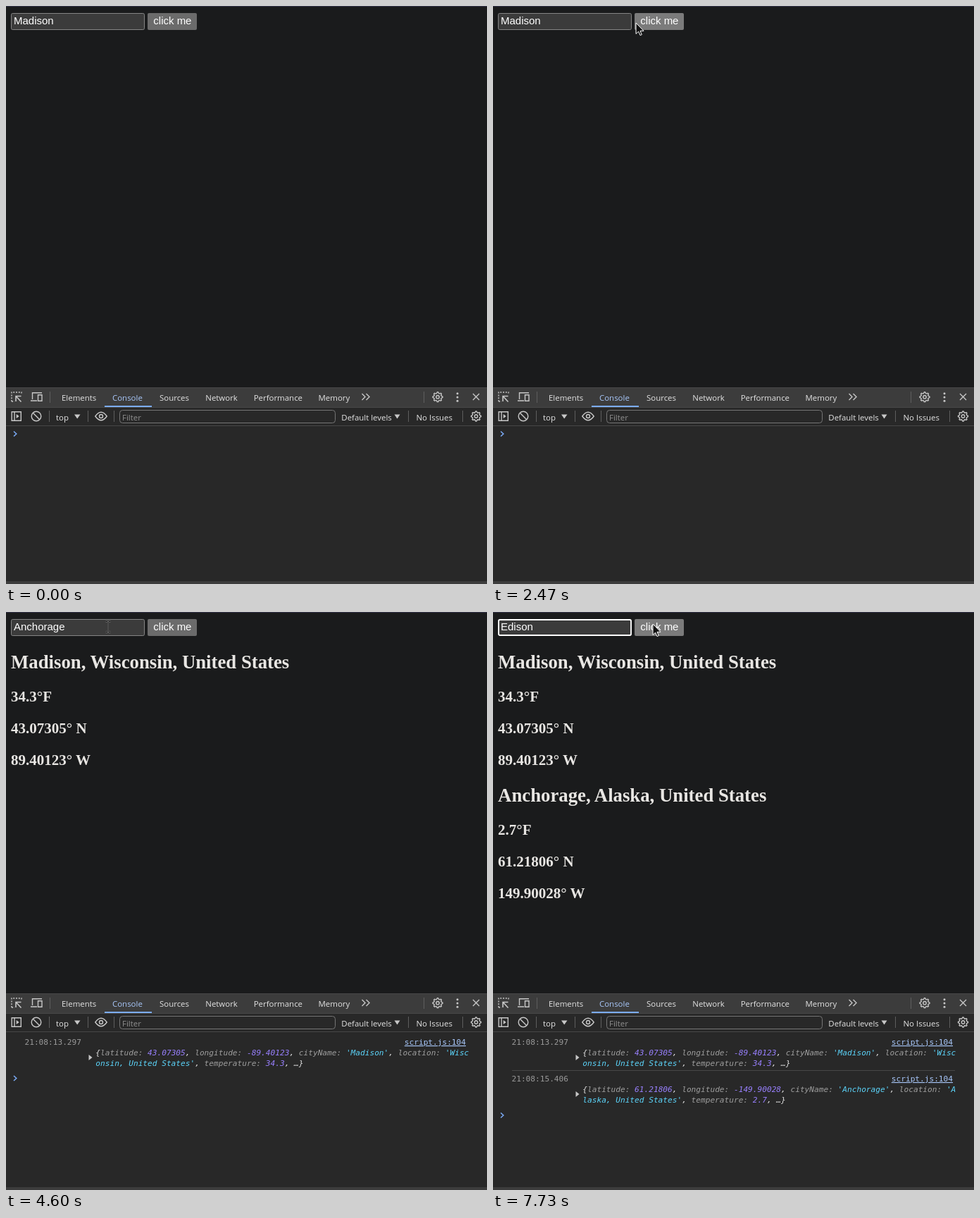
Recreate the animation shown at these times as an HTML page. Size 683x820 px, loop 8000 ms.

```html
<!DOCTYPE html>
<html lang="en">
<head>
<meta charset="utf-8">
<title>Weather lookup</title>
<style>
  html, body { margin: 0; width: 100%; height: 100%; overflow: hidden; background: #1a1b1c; }
  svg { display: block; }
  text { white-space: pre; }
  .ui { font: 11.45px "Open Sans", "Noto Sans", sans-serif; fill: #e3e3e3; }
  .field { font: 15px "Liberation Sans", Arial, sans-serif; fill: #fff; }
  .place { font: bold 26.75px "Liberation Serif", "Times New Roman", serif; fill: #e8e6e3; }
  .fact { font: bold 21px "Liberation Serif", "Times New Roman", serif; fill: #e8e6e3; }
  .mono { font: 11.15px "DejaVu Sans Mono", monospace; fill: #e3e3e3; }
  .preview { font-style: italic; }
  .key { fill: #9e9e9e; }
  .num { fill: #9980ff; }
  .str { fill: #5cd5fb; }
  .icon { fill: none; stroke: #c7c7c7; stroke-width: 1.4; }
  .solid { fill: #c7c7c7; }
  .sep { stroke: #5e5e5e; }
</style>
</head>
<body>
<svg id="stage" width="683" height="820" viewBox="0 0 683 820">
  <defs>
    <g id="gear" class="icon">
      <path id="teeth" stroke-linejoin="round"/>
      <circle r="2.2"/>
    </g>
    <path id="beam" d="M-3.5 -7.5H-1L0 -6.5 1 -7.5H3.5M0 -6.5V6.5M-3.5 7.5H-1L0 6.5 1 7.5H3.5"/>
  </defs>
  <rect width="683" height="820" fill="#1a1b1c"/>
  <rect width="683" height="1" fill="#303045"/>

  <g id="results"></g>

  <rect x="7.5" y="10.5" width="189" height="23" rx="2" fill="#3b3b3b" stroke="#858585"/>
  <rect id="ring" x="8" y="11" width="188" height="22" rx="2" fill="none" stroke="#fff" stroke-width="1.8"/>
  <rect id="selection" x="11" y="12" height="17" fill="#0855a6"/>
  <text id="value" class="field" x="11" y="26"></text>
  <rect id="caret" y="12" width="1" height="17" fill="#fff"/>
  <rect id="button" x="201" y="10" width="70" height="24" rx="2"/>
  <text class="field" x="209.3" y="26">click me</text>

  <g id="popup">
    <path d="M90 42.5L99.5 34.5 109 42.5Z" fill="#292a2c"/>
    <rect id="popupBox" x="79.5" y="42" width="160" rx="9" fill="#292a2c"/>
    <text id="option1" class="ui" x="92" y="68.3" style="fill:#fff"></text>
    <text id="option2" class="ui" x="92" y="104.8" style="fill:#fff">Madisonasd</text>
  </g>

  <rect y="541" width="683" height="279" fill="#282828"/>
  <rect y="541" width="683" height="28" fill="#3c3c3c"/>
  <path d="M0 541.5H683M0 569.5H683M0 595.5H683" stroke="#474747"/>
  <rect x="140" y="567" width="67" height="2" fill="#7cacf8"/>
  <rect y="816" width="683" height="4" fill="#3c3c3c"/>
  <g id="labels" class="ui"></g>
  <path class="sep" d="M62.5 547V563M593.5 547V563M61.5 574V590M116.5 574V590M153.5 574V590M571.5 574V590M648.5 574V590"/>
  <rect x="161.5" y="573.5" width="306" height="18" rx="4" fill="none" stroke="#757575"/>

  <g class="icon">
    <path d="M8 561V548H22V551" stroke-dasharray="2 1.8"/>
    <path d="M8 561H12" stroke-dasharray="2 1.8"/>
    <path d="M14 561V553.5H21.5M14.5 554L21.5 561.5" stroke-width="1.6"/>
    <path d="M37.5 558V548.7H51M35 560H44M45.5 551.7H51V560.3H45.5Z"/>
    <path d="M505.5 550L510 554.5 505.5 559M511.5 550L516 554.5 511.5 559"/>
    <path d="M663 550L672 559M672 550L663 559"/>
    <path d="M8.2 575.7H21.3V588.3H8.2ZM12 575.7V588.3"/>
    <circle cx="43" cy="582" r="6.8"/>
    <path d="M38.3 577.3L47.7 586.7"/>
    <path d="M126.8 582Q135 570.5 143.2 582Q135 593.5 126.8 582Z"/>
    <circle cx="135" cy="582" r="2.5"/>
  </g>
  <g class="solid">
    <path d="M14.7 579L18.7 582 14.7 585ZM97 579.5H105.5L101.2 585.5ZM551.5 579.5H559.5L555.5 585.5Z"/>
    <circle cx="641" cy="549.7" r="1.5"/><circle cx="641" cy="555" r="1.5"/><circle cx="641" cy="560.3" r="1.5"/>
  </g>
  <use href="#gear" x="613" y="554.7"/>
  <use href="#gear" x="667.5" y="582"/>

  <g id="logs"></g>
  <path id="prompt" d="M11 -3.5L14.8 0 11 3.5" fill="none" stroke="#7cacf8" stroke-width="1.5"/>

  <path id="arrow" d="M0 0V15.5L3.6 12.2 6 17.6 8.3 16.6 6 11.3H11Z" fill="#111" stroke="#fff"/>
  <g id="ibeam" fill="none">
    <use href="#beam" stroke="#858585" stroke-width="2"/>
    <use href="#beam" stroke="#111"/>
  </g>
</svg>
<script>
const $ = id => document.getElementById(id);
const LOOP = 8000, TICKS_PER_SECOND = 15;

const labels = [
  ["Elements", 79, 560], ["Console", 151, 560, "#a8c7fa"], ["Sources", 218, 560],
  ["Network", 283.3, 560], ["Performance", 351.7, 560], ["Memory", 443.5, 560],
  ["top", 71, 587.5], ["Filter", 165, 587.5, "#8f8f8f"],
  ["Default levels", 476.3, 587.5], ["No Issues", 582.5, 587.5]
];
$("labels").innerHTML = labels.map(([text, x, y, color = "#e3e3e3"]) =>
  `<text x="${x}" y="${y}" fill="${color}">${text}</text>`).join("");

// Eight teeth, four corners each: two outside, two inside
$("teeth").setAttribute("d", "M" + Array.from({ length: 32 }, (_, i) => {
  const radius = i % 4 < 2 ? 7 : 5.4, angle = (i - 0.5) * Math.PI / 16;
  return (radius * Math.cos(angle)).toFixed(2) + " " + (radius * Math.sin(angle)).toFixed(2);
}).join("L") + "Z");

const places = [
  { city: "Madison", region: "Wisconsin", temp: "34.3", lat: "43.07305", lon: "89.40123", time: "21:08:13.297", split: 4, tick: 38 },
  { city: "Anchorage", region: "Alaska", temp: "2.7", lat: "61.21806", lon: "149.90028", time: "21:08:15.406", split: 1, tick: 70 }
];

const span = (kind, text) => `<tspan class="${kind}">${text}</tspan>`;
const pair = (key, kind, value) => span("key", key + ":") + " " + span(kind, value);

function resultMarkup(p, i) {
  const facts = [`${p.temp}°F`, `${p.lat}° N`, `${p.lon}° W`];
  return `<g transform="translate(0 ${i * 189})">
    <text class="place" x="7.1" y="80">${p.city}, ${p.region}, United States</text>
    ${facts.map((f, n) => `<text class="fact" x="7" y="${127.3 + n * 44.9}">${f}</text>`).join("")}</g>`;
}

function logMarkup(p, i) {
  const where = `${p.region}, United States`;
  const first = "{" + [pair("latitude", "num", p.lat), pair("longitude", "num", "-" + p.lon),
    pair("cityName", "str", `'${p.city}'`),
    pair("location", "str", "'" + where.slice(0, p.split))].join(", ");
  const second = span("str", where.slice(p.split) + "'") + ", " + pair("temperature", "num", p.temp) + ", …}";
  return `<g transform="translate(0 ${i * 52})">
    ${i ? '<path d="M27 598.5H656" stroke="#474747"/>' : ""}
    <text class="mono" x="26.5" y="614" style="fill:#9a9a9a">${p.time}</text>
    <text class="mono" x="653" y="614" text-anchor="end" text-decoration="underline" style="fill:#a8c7fa">script.js:104</text>
    <path class="solid" d="M117.5 628L122.5 632 117.5 636Z"/>
    <text class="mono preview" x="127.3" y="628.8">${first}</text>
    <text class="mono preview" x="127.3" y="643.8">${second}</text></g>`;
}

$("results").innerHTML = places.map(resultMarkup).join("");
$("logs").innerHTML = places.map(logMarkup).join("");

// Pointer path: tick, x, y
const path = [
  [2, 650, 730], [6, 300, 220], [9, 135, 25], [10, 130, 22], [12, 130, 22], [14, 128, 22],
  [16, 128, 22], [20, 250, 24], [23, 250, 24], [24, 251, 25], [27, 253, 26], [33, 253, 26],
  [40, 166, 22], [42, 160, 21], [63, 160, 21], [65, 226, 22], [66, 226, 22], [69, 145, 21],
  [72, 145, 21], [75, 96, 28], [99, 96, 28], [100, 98, 28], [102, 98, 28], [112, 227, 17]
];

function pointerAt(t) {
  let i = 0;
  while (i < path.length - 2 && path[i + 1][0] <= t) i++;
  const [t0, x0, y0] = path[i], [t1, x1, y1] = path[i + 1];
  const k = Math.min(1, Math.max(0, (t - t0) / (t1 - t0)));
  return [x0 + (x1 - x0) * k, y0 + (y1 - y0) * k];
}

const focused = [[9, 30], [43, 66], [73, 120]];
const caretOn = [[9, 22], [27, 30], [43, 49], [52, 66], [73, 77], [82, 100], [108, 116]];
const selected = [[49, 52], [77, 82]];
const twoOptions = [[10, 30], [44, 49]];
const oneOption = [[86, 94]];
const clicking = [[30, 31], [66, 67]];
const during = (spans, t) => spans.some(([from, to]) => t >= from && t < to);

function typed(t) {
  if (t < 52) return "Madison";
  if (t < 82) return "Anchorage".slice(0, t - 51);
  return "Edison".slice(0, t < 85 ? 1 : 2 + Math.floor((t - 85) / 2));
}

function show(id, on) {
  $(id).style.display = on ? "" : "none";
}

function render(t) {
  $("value").textContent = typed(t);
  const width = $("value").getComputedTextLength();
  $("selection").setAttribute("width", width);
  $("caret").setAttribute("x", Math.floor(11.2 + width));
  show("selection", during(selected, t));
  show("caret", during(caretOn, t));
  show("ring", during(focused, t));

  const two = during(twoOptions, t);
  show("popup", two || during(oneOption, t));
  show("option2", two);
  $("option1").textContent = two ? "madison" : "Edison";
  $("popupBox").setAttribute("height", two ? 82 : 45);

  places.forEach((p, i) => {
    for (const id of ["results", "logs"]) $(id).children[i].style.display = t >= p.tick ? "" : "none";
  });
  const logged = places.filter(p => t >= p.tick).length;
  $("prompt").setAttribute("transform", `translate(0 ${[607, 661.5, 714][logged]})`);

  const [x, y] = pointerAt(t);
  const inRow = y >= 10 && y < 34;
  const overInput = inRow && x < 197;
  const overButton = inRow && x >= 201 && x < 271;
  $("button").setAttribute("fill", during(clicking, t) ? "#616161" : overButton ? "#7b7b7b" : "#6b6b6b");
  show("arrow", t >= 2 && !overInput);
  show("ibeam", t >= 2 && overInput);
  const place = `translate(${Math.round(x)} ${Math.round(y)})`;
  $("arrow").setAttribute("transform", place);
  $("ibeam").setAttribute("transform", place);
}

const start = performance.now();
function loop() {
  const elapsed = (performance.now() - start) % LOOP;
  render(Math.floor((elapsed + 5) * TICKS_PER_SECOND / 1000) % 120);
  requestAnimationFrame(loop);
}
loop();
</script>
</body>
</html>
```
